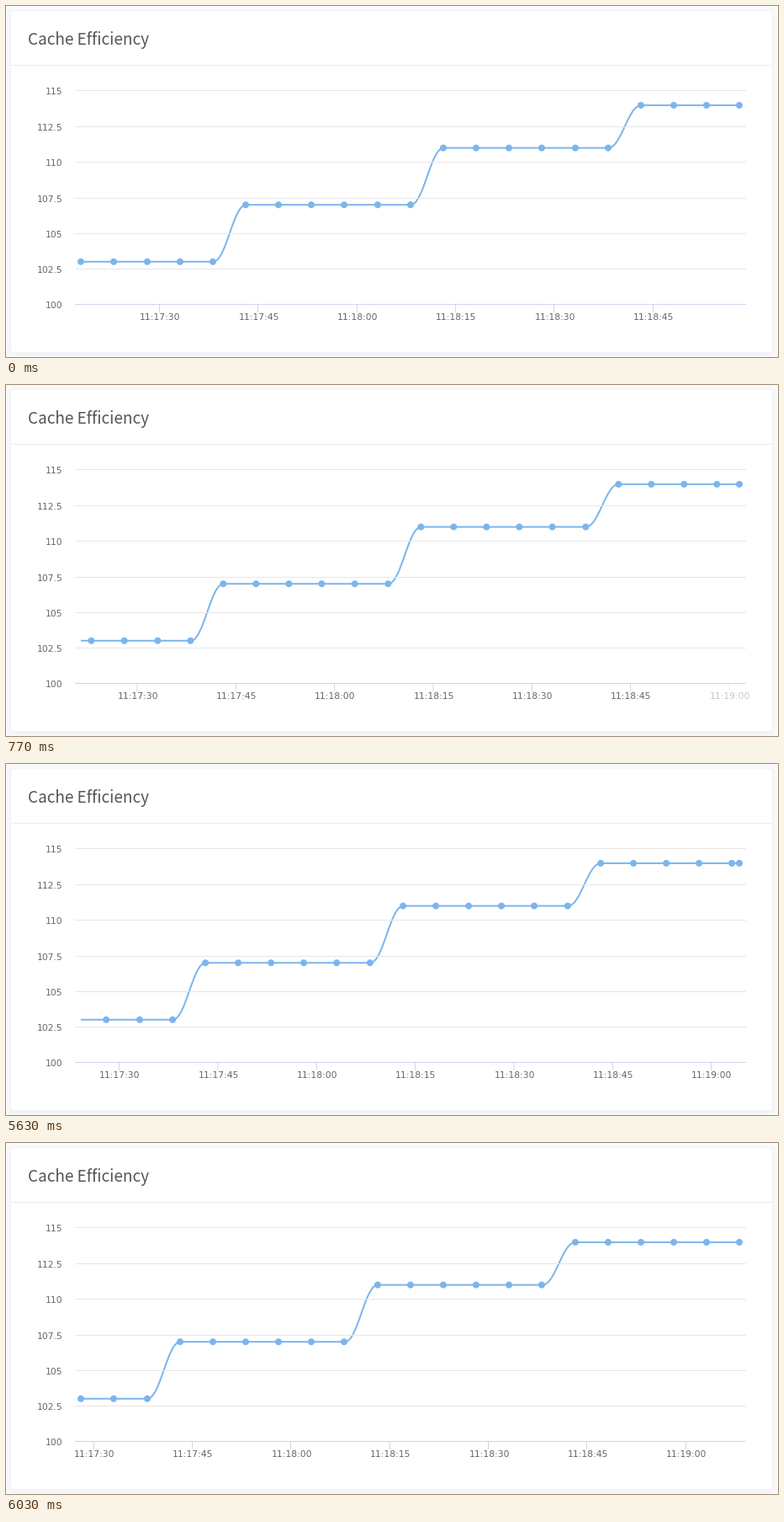
These frames come from a looping animation (918 by 417 pixels, 8000 ms). A matplotlib script:

```python
import math

import matplotlib.pyplot as plt
from matplotlib.animation import FuncAnimation
from matplotlib.patches import FancyBboxPatch, PathPatch
from matplotlib.path import Path

W, H, DPI = 918, 417, 100
PT = 72 / DPI                      # points per pixel
LOOP, INTERVAL = 8000, 20
STEP = 200 / 3                     # the chart is redrawn 15 times a second
STARTS, SLIDE = (457, 5475), 500   # when a new sample pushes the chart left

BLUE, GRID, AXIS, INK = "#7cb5ec", "#e6e6e6", "#ccd6eb", "#666666"
LEFT, RIGHT, BOTTOM = 82, 880, 354
FIRST_X, LAST_X = 89.75, 872.75
SHOWN = 21
GAP = (LAST_X - FIRST_X) / (SHOWN - 1)
TICK_X, TICK_GAP = 182.36, 117.35
VALUES = [103] * 5 + [107] * 6 + [111] * 6 + [114] * 6

fig = plt.figure(figsize=(W / DPI, H / DPI), dpi=DPI, facecolor="#f9fafc")
ax = fig.add_axes([0, 0, 1, 1])
ax.set_xlim(0, W)
ax.set_ylim(H, 0)
ax.axis("off")


def card(grow, dy, radius, **style):
    ax.add_patch(FancyBboxPatch(
        (6 - grow, 6 - grow + dy), 905 + 2 * grow, 405 + 2 * grow,
        boxstyle=f"round,pad=0,rounding_size={radius}", lw=0, **style))


def rule(x0, x1, row, color):
    ax.plot([x0, x1], [row + 0.5] * 2, color=color, lw=PT,
            solid_capstyle="butt", snap=False)


def label(x, y, text, size, ha, color=INK, font="DejaVu Sans"):
    return ax.text(x, y, text, fontsize=size * PT, ha=ha, va="baseline",
                   color=color, family=font)


def y_of(value):
    return BOTTOM + 0.5 - (value - 100) * 16.9


def slot(i):
    """Whole-pixel resting place of the i-th marker."""
    return math.floor(FIRST_X + i * GAP)


def ease(p):
    p = min(max(p, 0), 1)
    return (1 - math.cos(math.pi * p)) / 2


for grow in range(6, 0, -1):
    card(grow, 2, 4 + grow, fc="#30406a", alpha=0.004)
card(0, 0, 4, fc="white")
rule(6, 911, 70, "#ebebed")
label(26, 45.5, "Cache Efficiency", 19, "left", "#55565a", "Noto Sans CJK JP")

for i, row in enumerate((354, 312, 270, 228, 185, 143, 100)):
    rule(LEFT, RIGHT, row, GRID if i else AXIS)
    label(67.5, row + 5, f"{100 + 2.5 * i:g}", 10.8, "right")

ticks = []
for i in range(7):
    mark, = ax.plot([], [], color=AXIS, lw=PT, solid_capstyle="butt",
                    snap=False)
    minute, second = divmod(17 * 60 + 30 + 15 * i, 60)
    name = label(0, 373, f"11:{minute}:{second:02d}", 10.8, "center")
    ticks.append((mark, name))

line = ax.add_patch(PathPatch(Path([(0, 0)]), fc="none", ec=BLUE, lw=2 * PT,
                              capstyle="round", joinstyle="round",
                              snap=False))
dots = ax.add_patch(PathPatch(Path([(0, 0)]), fc=BLUE, lw=0, snap=False))


def spline(points):
    verts, codes = [points[0]], [Path.MOVETO]
    for (x0, y0), (x1, y1) in zip(points, points[1:]):
        bend = 0.4 * (x1 - x0)
        verts += [(x0 + bend, y0), (x1 - bend, y1), (x1, y1)]
        codes += [Path.CURVE4] * 3
    return Path(verts, codes)


def draw(frame):
    t = frame * INTERVAL + 15
    t = 500 + STEP * math.floor((t - 500) / STEP)
    slides = [ease((t - start) / SLIDE) for start in STARTS]
    shift = sum(slides)
    dropped = sum(s > 0 for s in slides)
    resting = all(s in (0, 1) for s in slides)

    whole = math.floor(shift)
    part = shift - whole
    points, centres = [], []
    for k in range(dropped, dropped + SHOWN):
        y = y_of(VALUES[k])
        points.append((FIRST_X + (k - shift) * GAP, y))
        i = k - whole
        centres.append((slot(i) * (1 - part) + slot(i - 1) * part, y))
    # the newest sample appears in place at the right end
    points[-1] = (LAST_X, y)
    centres[-1] = (slot(SHOWN - 1), y)
    line.set_path(spline([(FIRST_X, points[0][1])] + points))
    dots.set_path(Path.make_compound_path(
        *(Path.circle(c, 4) for c in centres)))

    for i, (mark, name) in enumerate(ticks):
        x = TICK_X + i * TICK_GAP - shift * TICK_GAP / 3
        at = math.floor(x) + 0.5 if resting else x + 0.3
        mark.set_data([at, at], [BOTTOM + 1, BOTTOM + 10])
        name.set_x(x + 1)
        # the newest time label fades in late in the first slide
        alpha = max(0, 2 * slides[0] - 1) if i == 6 else 1
        mark.set_alpha(alpha)
        name.set_alpha(alpha)
    return []


anim = FuncAnimation(fig, draw, frames=LOOP // INTERVAL, interval=INTERVAL,
                     init_func=lambda: draw(0), repeat=True, repeat_delay=0)
plt.show()
```
